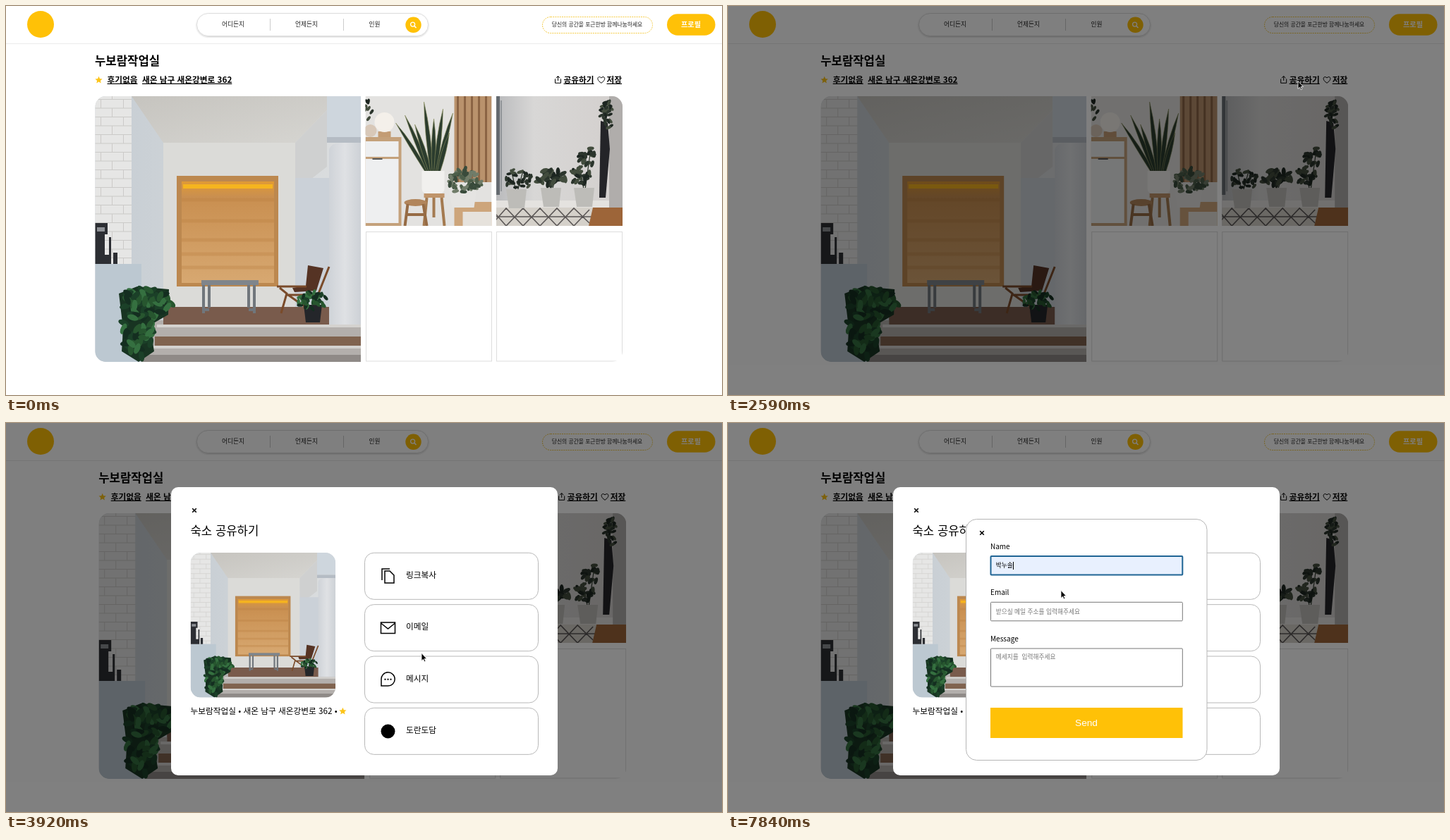
Write an HTML page that moves like this. It is 1015x552 px and loops after 8000 ms.

```html
<!DOCTYPE html>
<html lang="ko">
<head>
<meta charset="utf-8">
<title>숙소 공유하기</title>
<style>
html, body { margin: 0; width: 100%; height: 100%; overflow: hidden; background: #fff; }
svg { display: block; }
text { font: 500 11.7px "Noto Sans CJK KR", "Noto Sans CJK", "Noto Sans", sans-serif; white-space: pre; }
.nav { font-size: 8.7px; fill: #222; }
.title { font-size: 16.7px; }
.bold { font-weight: 700; }
.link { text-decoration: underline; text-decoration-thickness: 1px; text-underline-offset: 1.5px; }
.label { font-size: 10px; }
.hint { font-size: 8.7px; font-weight: 400; fill: #757575; }
.line { fill: none; stroke: #000; }
.box { fill: #fff; stroke: #ddd; }
.option { fill: #fff; stroke: #b8b8b8; }
.option.hover { fill: #f7f7f7; }
.field { fill: #fff; stroke: #767676; }
.field.hover { stroke: #222; }
.field.focus { stroke: #1f6494; stroke-width: 2; }
.field.filled { fill: #e8f0fe; }
</style>
</head>
<body>
<svg width="1015" height="552" viewBox="0 0 1015 552">
  <defs>
    <clipPath id="galleryClip"><rect x="126.5" y="128" width="747.5" height="377" rx="15"/></clipPath>
    <clipPath id="thumbClip"><rect width="377" height="377" rx="27"/></clipPath>
    <clipPath id="squareClip"><rect width="377" height="377"/></clipPath>
    <clipPath id="smallClip"><rect width="179" height="184"/></clipPath>
    <filter id="shadow" x="-5%" y="-20%" width="110%" height="150%">
      <feDropShadow dx="0" dy="1" stdDeviation=".8" flood-opacity=".2"/>
    </filter>
    <pattern id="bricks" width="32" height="25" patternUnits="userSpaceOnUse">
      <rect width="32" height="25" fill="#e6e6e5"/>
      <path d="M0 4.5H32M0 17H32M8.5 4.5V17M24.5 17V25M24.5 0V4.5" stroke="#cbcac8"/>
    </pattern>
    <linearGradient id="wall" x2="1"><stop stop-color="#c6cdd3"/><stop offset="1" stop-color="#dcdedf"/></linearGradient>
    <linearGradient id="ceiling" x2="1" y2="1"><stop stop-color="#c6c4bf"/><stop offset="1" stop-color="#d6d5d1"/></linearGradient>
    <linearGradient id="column" x2="1"><stop stop-color="#cfd3d8"/><stop offset=".5" stop-color="#dfe1e4"/><stop offset="1" stop-color="#cdd1d6"/></linearGradient>
    <linearGradient id="wood" x2="0" y2="1"><stop stop-color="#e09a35"/><stop offset=".15" stop-color="#c98f50"/><stop offset="1" stop-color="#d7a871"/></linearGradient>
    <linearGradient id="gray" x2="1"><stop stop-color="#b9babc"/><stop offset=".3" stop-color="#d8d7d6"/><stop offset="1" stop-color="#d3cfcd"/></linearGradient>
    <path id="star" fill="#fcc419" d="M0-5.2 1.5-1.8 5.1-1.5 2.4.9 3.2 4.5 0 2.6-3.2 4.5-2.4.9-5.1-1.5-1.5-1.8Z"/>
    <path id="close" d="M-2.8-2.8 2.8 2.8M2.8-2.8-2.8 2.8" stroke="#000" stroke-width="1.6"/>

    <g id="room" clip-path="url(#squareClip)">
      <rect width="377" height="377" fill="url(#wall)"/>
      <path d="M52 0H329V20L284 66H97Z" fill="url(#ceiling)"/>
      <path d="M97 66H284V302H97Z" fill="#dbdbd8"/>
      <path d="M284 66 329 20V100L284 135Z" fill="#cfd0d0"/>
      <path d="M284 116H333V310H284Z" fill="#cbd1d8"/>
      <path d="M329 0H377V58H329Z" fill="#ced6dd"/>
      <path d="M329 58H377V66H329Z" fill="#b5bcc4"/>
      <path d="M332 76Q334 66 352 66H377V332H332Z" fill="url(#column)"/>
      <rect width="52" height="238" fill="url(#bricks)"/>
      <path d="M0 238H66V377H0Z" fill="#bcc8d1"/>
      <path d="M0 180H18V196H14V225H22V238H0ZM26 222H32V238H26ZM20 200H23V238H20Z" fill="#2c2e33"/>
      <path d="M3 186H14V192H3Z" fill="#8e9196"/>
      <path d="M97 299H332V324H97Z" fill="#795b4c"/>
      <path d="M66 318H97V324H377V377H66Z" fill="#b3afac"/>
      <path d="M85 341H377V354H85Z" fill="#80634f"/>
      <path d="M88 324H377V328H88ZM75 354H377V358H75Z" fill="#d4d2cf"/>
      <path d="M66 367H377V377H66Z" fill="#8f8a87"/>
      <rect x="116" y="113" width="144" height="157" fill="#bc884f"/>
      <rect x="123" y="121" width="131" height="144" fill="url(#wood)"/>
      <rect x="125" y="125" width="127" height="6" fill="#f5b41f"/>
      <path d="M123 147H254M123 177H254M123 204H254M123 224H254M123 243H254" stroke="#b57a3d" stroke-width="5" stroke-opacity=".3"/>
      <path d="M154 308V265M226 308V265M162 300V268M218 300V268M154 303H162M218 303H226" stroke="#70767c" stroke-width="4"/>
      <path d="M151 261H232V268H151Z" fill="#7f858b"/>
      <path d="M302 240 324 244 314 276 283 278 280 272 299 269Z" fill="#553324"/>
      <path d="M258 270H300M262 272 272 280 264 308M272 282H310M332 242 309 300M274 282 308 306" fill="none" stroke="#7a4b2a" stroke-width="3"/>
      <path d="M296 296H322L319 321H299Z" fill="#24262a"/>
      <path d="M34 280 60 270 105 274 104 310 78 325 84 362 62 377 38 362 40 330Z" fill="#183422"/>
      <g id="roomLeaves"></g>
    </g>

    <g id="shelf" clip-path="url(#smallClip)">
      <rect width="179" height="184" fill="#e3e2e0"/>
      <path d="M126 0H179V122H126Z" fill="#b9926c"/>
      <path d="M131 0V122M141 0V122M151 0V122M161 0V122M171 0V122" stroke="#8b6444" stroke-width="3"/>
      <path d="M0 58H51V184H0Z" fill="#c4a17b"/>
      <path d="M0 64H47V86H0ZM0 89H47V180H0Z" fill="#eeeff0"/>
      <path d="M10 89H24" stroke="#555" stroke-width="2"/>
      <path d="M18 50H36V58H18Z" fill="#c39c74"/>
      <circle cx="27" cy="37" r="14" fill="#f4f0ea"/>
      <circle cx="7" cy="49" r="9" fill="#d8c8b8"/>
      <path d="M126 150H179V184H126Z" fill="#cda57b"/>
      <path d="M138 164H179V184H138Z" fill="#e6e2dc"/>
      <path d="M83 138H112V144H83Z" fill="#bf946a"/>
      <path d="M87 144 83 184M108 144 112 184M97 144V172" stroke="#a47a50" stroke-width="4"/>
      <ellipse cx="71" cy="151" rx="16" ry="5" fill="#b1855b"/>
      <path d="M60 153 56 184M82 153 87 184M59 168H84" stroke="#966b44" stroke-width="4"/>
      <g id="blades" stroke="#8d9160" stroke-width=".6" fill="#2b3c2e"></g>
      <path d="M80 106H112V131Q112 138 105 138H87Q80 138 80 131Z" fill="#f1f0ee"/>
      <path d="M118 130H158L154 158H123Z" fill="#e5e4e2"/>
      <g id="shelfLeaves"></g>
    </g>

    <g id="corner" clip-path="url(#smallClip)">
      <rect width="179" height="184" fill="url(#gray)"/>
      <path d="M0 0H5V140H0Z" fill="#646a70"/><path d="M7 6V135" stroke="#929599" stroke-width="2"/>
      <path d="M0 148H179V160H0Z" fill="#e4e2df"/>
      <path d="M160 0H179V160H160Z" fill="#b0adab"/>
      <path d="M148 35 158 38 161 75 155 144H146Z" fill="#242428"/>
      <path d="M0 158H145L135 184H0Z" fill="#d5d1ca"/>
      <path d="M-8 184 14 159 38 184 62 159 86 184 110 159 132 180M-8 159 14 184 38 159 62 184 86 159 110 184 132 161M0 171H136" fill="none" stroke="#5b5756" stroke-width="1.6"/>
      <path d="M137 158H179V184H131Z" fill="#9d6539"/>
      <path d="M28 135 22 108M30 135 38 106M78 133 70 108M79 133 88 106M124 132 118 98M126 132 134 75M156 10V45" stroke="#2f392e" stroke-width="1.3"/>
      <path id="pot" d="M14 132H43L40 159H18Z" fill="#bdbcb8"/>
      <use href="#pot" x="49" y="-2"/><use href="#pot" x="96" y="-2"/>
      <g id="cornerLeaves"></g>
    </g>
  </defs>

  <rect width="1015" height="552" fill="#fff"/>
  <path d="M0 53.5H1015" stroke="#ebebeb"/>
  <circle cx="49" cy="26" r="19" fill="#ffc107"/>
  <rect x="270.5" y="10.5" width="328" height="32" rx="16" class="box" filter="url(#shadow)"/>
  <path d="M374.5 18V35M478.5 18V35" stroke="#ccc"/>
  <g text-anchor="middle">
    <text class="nav" x="322" y="29">어디든지</text>
    <text class="nav" x="426" y="29">언제든지</text>
    <text class="nav" x="522.5" y="29">인원</text>
    <text class="nav" x="838" y="29.2" style="font-size:7.8px">당신의 공간을 포근한방 함께나눔하세요</text>
    <rect x="937" y="11.3" width="68.5" height="30.4" rx="15.2" fill="#ffc107"/>
    <text class="bold" x="971" y="29.8" fill="#fff" style="font-size:10.1px">프로필</text>
  </g>
  <circle cx="577.5" cy="26.8" r="11.2" fill="#ffc107"/>
  <path d="M578.8 28.3 581.5 31" stroke="#fff" stroke-width="1.6"/>
  <circle cx="576.6" cy="26.1" r="3" fill="none" stroke="#fff" stroke-width="1.3"/>
  <rect x="760.5" y="15.5" width="156" height="23" rx="11.5" fill="none" stroke="#f5cc45" stroke-dasharray="2 1.2"/>

  <g id="page">
    <text class="title bold" x="126" y="84">누보람작업실</text>
    <use href="#star" x="131.5" y="105"/>
    <text class="link bold" x="143.5" y="108.8">후기없음</text>
    <text class="link bold" x="193" y="108.8">새온 남구 새온강변로 362</text>
    <path class="line" d="M778.5 103.5V109.3H786.5V103.5M782.5 106V99.8M779.8 102.2 782.5 99.5 785.2 102.2"/>
    <text class="link bold" x="790.5" y="108.8">공유하기</text>
    <path class="line" d="M843.8 109.3C835 103.5 840 98 843.8 102C847.6 98 852.6 103.5 843.8 109.3Z"/>
    <text class="link bold" x="851.5" y="108.8">저장</text>
    <g clip-path="url(#galleryClip)">
      <use href="#room" x="126" y="128"/>
      <use href="#shelf" x="509.5" y="128"/>
      <use href="#corner" x="695" y="128"/>
      <rect x="510.5" y="320.5" width="178" height="183.5" class="box"/>
      <rect x="695.5" y="320.5" width="178" height="183.5" class="box"/>
    </g>
  </g>

  <rect id="overlay" width="1015" height="552" fill-opacity=".5"/>

  <g id="modal">
    <rect x="234" y="91" width="548" height="409" rx="10" fill="#fff"/>
    <use href="#close" x="267" y="124"/>
    <text class="title" x="261.5" y="159">숙소 공유하기</text>
    <g transform="translate(261.7 184) scale(.545)"><use href="#room" clip-path="url(#thumbClip)"/></g>
    <text x="261.5" y="413">누보람작업실 • 새온 남구 새온강변로 362 •</text>
    <use href="#star" x="477.4" y="409"/>
    <g id="options"></g>
    <path class="line" stroke-width="1.5" d="M537 210H544L550 216V227H537ZM533 223V207H544M531.5 283H551.5V298.5H531.5ZM531.5 284 541.5 292 551.5 284M532 373V364A9.6 9.6 0 1 1 541.5 373Z"/>
    <path d="M536.5 363.7H538.5M540.5 363.7H542.5M544.5 363.7H546.5" stroke="#000" stroke-width="2"/>
    <circle cx="541.5" cy="437.5" r="10"/>
  </g>

  <g id="form">
    <rect x="337.5" y="136.5" width="341.5" height="342" rx="15" fill="#fff" stroke="#b5b5b5"/>
    <use href="#close" x="360" y="156"/>
    <g id="fields"></g>
    <rect x="372" y="404" width="272.5" height="43" fill="#ffc107"/>
    <text x="508" y="430.3" text-anchor="middle" fill="#fff" style="font:13.7px 'Liberation Sans', Arial, sans-serif">Send</text>
    <path id="caret" stroke="#000" d="M0 197V208"/>
  </g>

  <g id="cursor" stroke="#fff" stroke-width=".8">
    <path id="arrow" d="M0-.5V10.5L2.5 8.2 4.1 11.8 5.8 11.1 4.2 7.6H7.5Z"/>
    <path id="hand" fill="#fff" stroke="#000" d="M-.8 1Q.2-.6 1.2 1V5L5.5 5.8Q7 6.2 6.6 8.2L5.6 11.5H1L-2 7.6Q-2.3 6 -.8 6.8Z"/>
    <path id="beam" fill="none" stroke="#222" stroke-width="1.1" d="M-2.2-5.5Q0-5.5 0-4Q0-5.5 2.2-5.5M0-4.5V4.5M-2.2 5.5Q0 5.5 0 4Q0 5.5 2.2 5.5"/>
  </g>
</svg>

<script>
const $ = id => document.getElementById(id);
const STEP = 70, LOOP = 8000;
const OPEN_MODAL = 2590, OPEN_FORM = 5390, FOCUS = 6440, PREVIEW = 7350, FILL = 7840;

let seed = 7;
const rand = () => (seed = seed * 16807 % 2147483647) / 2147483647;

// Scatters leaves inside an ellipse
function leaves(n, cx, cy, rx, ry, size, colors) {
  return Array.from({ length: n }, () => {
    const angle = rand() * 2 * Math.PI, r = Math.sqrt(rand());
    const x = cx + rx * r * Math.cos(angle), y = cy + ry * r * Math.sin(angle);
    return `<ellipse rx="${size}" ry="${size * .5}" fill="${colors[rand() * colors.length | 0]}"
      transform="translate(${x} ${y}) rotate(${rand() * 180})"/>`;
  }).join('');
}
const greens = ['#1b4028', '#27562f', '#357040', '#142e20'];
const darks = ['#1d2621', '#2b352c', '#424c3d'];
$('roomLeaves').innerHTML =
  leaves(50, 71, 294, 38, 20, 8, greens) + leaves(38, 60, 342, 25, 34, 8, greens) +
  leaves(45, 308, 290, 22, 12, 4.5, greens);
$('shelfLeaves').innerHTML =
  leaves(50, 142, 121, 23, 18, 5, ['#4d5f4a', '#394b3b', '#707c69']) + leaves(8, 4, 18, 6, 14, 4, darks);
$('cornerLeaves').innerHTML =
  leaves(34, 31, 118, 22, 14, 4, darks) + leaves(28, 78, 115, 22, 12, 6, darks) +
  leaves(22, 119, 112, 14, 12, 5, darks) + leaves(18, 129, 84, 12, 16, 5, darks) +
  leaves(30, 157, 27, 9, 20, 4, darks);
$('blades').innerHTML = [[43, 38], [56, 27], [70, 40], [83, 8], [97, 32], [110, 18], [124, 24], [119, 52]]
  .map(([x, y], i) => {
    const base = 87 + i * 2.4, mx = (x + base) / 2, my = y * .55 + 48;
    return `<path d="M${base - 2} 108Q${mx - 5} ${my} ${x} ${y}Q${mx + 5} ${my} ${base + 2} 108Z"/>`;
  }).join('');

const optionTop = i => 184.3 + i * 73.35;
$('options').innerHTML = ['링크복사', '이메일', '메시지', '도란도담'].map((name, i) =>
  `<rect class="option" x="508.5" y="${optionTop(i)}" width="246" height="66" rx="13"/>
   <text x="567" y="${optionTop(i) + 35.7}">${name}</text>`).join('');

const inputs = [
  ['Name', '이름을 입력해주세요', 189, 26.5],
  ['Email', '받으실 메일 주소를 입력해주세요', 254.3, 26.5],
  ['Message', '메세지를  입력해주세요', 320, 54],
];
$('fields').innerHTML = inputs.map(([label, hint, y, h]) =>
  `<text class="label" x="372" y="${y - 10}">${label}</text>
   <rect class="field" x="372.5" y="${y}" width="271.8" height="${h}" rx="1"/>
   <text class="hint" x="379.7" y="${y + (h > 30 ? 15.2 : 16.2)}">${hint}</text>`).join('');

const options = document.querySelectorAll('.option');
const fields = document.querySelectorAll('.field');
const nameText = document.querySelector('.hint');

const slide = $('modal').animate(
  [{ transform: 'translateY(197px)', opacity: 0 }, { transform: 'none', opacity: 1 }],
  { duration: 500, easing: 'ease', fill: 'both' });
slide.pause();

// Pointer path: time, x, y
const path = [
  [70, 826, 438], [280, 822, 430], [420, 820, 420], [1190, 806, 112], [1470, 806, 112], [1540, 808, 107],
  [2730, 808, 107], [2940, 799, 112], [3150, 620, 352], [3360, 612, 352], [3920, 589, 327],
  [4130, 584, 300], [4270, 584, 300], [4550, 575, 292], [5460, 575, 292], [5740, 530, 330],
  [5950, 497, 263], [6230, 475, 222], [6440, 455, 207], [6650, 441, 217], [6790, 441, 217],
  [6860, 482, 241], [7770, 482, 241], [7840, 472, 238], [LOOP, 472, 238],
];
function pointer(t) {
  const i = Math.max(1, path.findIndex(p => p[0] > t));
  const [t0, x0, y0] = path[i - 1], [t1, x1, y1] = path[i];
  const k = Math.max(0, (t - t0) / (t1 - t0));
  return [x0 + (x1 - x0) * k, y0 + (y1 - y0) * k];
}

const show = (id, on) => $(id).style.display = on ? '' : 'none';
const mark = (el, name, on) => el.classList.toggle(name, on);

function draw(t) {
  const modal = t >= OPEN_MODAL, form = t >= OPEN_FORM, filled = t >= PREVIEW;
  const [x, y] = pointer(t);
  let shape = t >= 1540 && !modal ? 'hand' : 'arrow';

  $('page').setAttribute('transform', `translate(${modal ? 5.2 : 0} 0)`);
  show('overlay', modal);
  show('modal', modal);
  show('form', form);
  slide.currentTime = Math.min(500, Math.max(0, t - 2600));

  options.forEach((el, i) => {
    const over = t >= 3150 && !form && x > 508 && x < 755 && y > optionTop(i) && y < optionTop(i) + 66;
    mark(el, 'hover', over);
    if (over) shape = 'hand';
  });
  fields.forEach((el, i) => {
    const [, , top, height] = inputs[i];
    const over = form && y > top && y < top + height;
    mark(el, 'hover', over);
    if (over) shape = 'beam';
  });
  mark(fields[0], 'focus', t >= FOCUS);
  mark(fields[0], 'filled', filled);
  nameText.textContent = filled ? '박누솔' : inputs[0][1];
  nameText.style.fill = filled ? '#000' : '';
  show('caret', t >= FOCUS && t < 7140 || t >= FILL);
  $('caret').setAttribute('transform', `translate(${filled ? 404.5 : 380.5} 0)`);

  show('cursor', t >= 70);
  $('cursor').setAttribute('transform', `translate(${x} ${y})`);
  for (const id of ['arrow', 'hand', 'beam']) show(id, id === shape);
}

function tick() {
  draw(Math.floor(performance.now() % LOOP / STEP) * STEP);
  requestAnimationFrame(tick);
}
tick();
</script>
</body>
</html>
```
